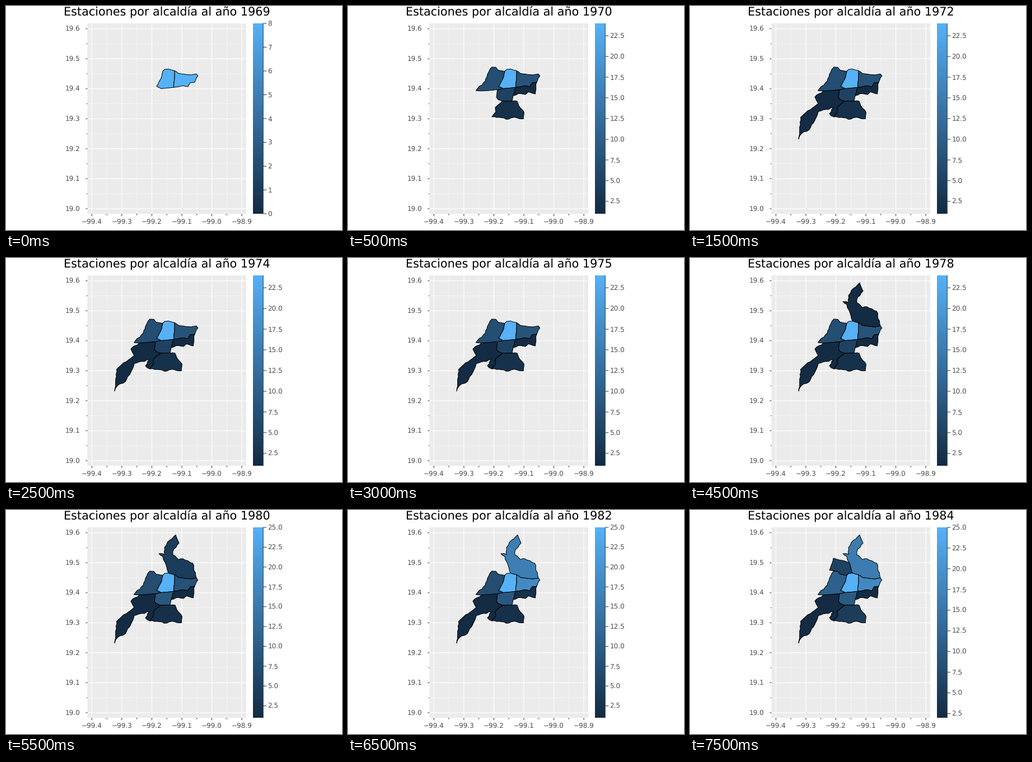
These frames come from a looping animation (600 px wide and 400 px high, 8 s). A matplotlib script:

```python
import matplotlib.pyplot as plt
import numpy as np
from matplotlib.animation import FuncAnimation
from matplotlib.colors import LinearSegmentedColormap
from matplotlib.patches import Polygon, Rectangle

plt.rcParams.update({"font.family": "DejaVu Sans", "text.hinting": "none",
                     "path.snap": False})

W, H, DPI = 600, 400, 100
PX = 72 / DPI  # points per pixel
LEFT, RIGHT, TOP, BOTTOM = 145.5, 429, 31, 371
BAR_L, BAR_R = 441.3, 459.3
STEP = 53.55  # pixels per 0.1 degree
TEXT, AXIS = "#4d4d4d", "#333333"
FIRST_YEAR, YEARS = 1969, 16
BLUES = LinearSegmentedColormap.from_list("blues", ["#132b43", "#56b1f7"])

fig = plt.figure(figsize=(W / DPI, H / DPI), dpi=DPI, facecolor="white")
ax = fig.add_axes([0, 0, 1, 1])
ax.axis("off")
rng = np.random.default_rng(7)


def line(x, y, color, width=1, z=1, **kw):
    return ax.plot(x, y, color=color, lw=width * PX, zorder=z,
                   solid_capstyle="butt", **kw)[0]


def label(x, y, text, ha, size=12, color=TEXT):
    return ax.text(x, y, text, ha=ha, va="baseline",
                   fontsize=size * PX, color=color)


def draw_axes():
    ax.add_patch(Rectangle((LEFT, TOP), RIGHT - LEFT, BOTTOM - TOP,
                           fc="#ebebeb", ec="none", zorder=0))
    for i in range(13):
        major = i % 2 == 0
        grid = dict(color="white", width=1.2 if major else 0.7,
                    alpha=1 if major else 0.65)
        tick = 3.2 if major else 1.7

        y = 362 - i * STEP / 2
        line([LEFT, RIGHT], [y, y], **grid)
        line([LEFT - tick, LEFT], [y, y], AXIS)
        if major:
            label(132.7, y + 4.5, f"{19 + i / 20:.1f}", "right")

        x = 153.4 + i * STEP / 2
        if x < RIGHT:
            line([x, x], [TOP, BOTTOM], **grid)
            line([x, x], [BOTTOM, BOTTOM + tick + 1], AXIS)
            if major:
                label(x, 390, f"\u2212{99.4 - i / 20:.1f}", "center")


def rough(*points, amp=0.4):
    """Border through key points, made ragged in pieces of about 4 px."""
    out = [points[0]]
    for a, b in zip(np.array(points), np.array(points[1:])):
        dx, dy = b - a
        length = np.hypot(dx, dy)
        n = max(1, int(length // 4))
        t = np.arange(1, n + 1)[:, None] / n
        shift = rng.uniform(-amp, amp, (n, 1))
        shift[-1] = 0
        out.extend(a + t * (b - a) + shift * np.array([-dy, dx]) / length)
    return np.array(out)


def coast(*points):
    return rough(*points, amp=1.1)


def back(border):
    return border[::-1]


# Corners where three boroughs meet
NW, N, NE = (280, 116.5), (290, 112.5), (301, 115.5)
SE, S, SW = (299.5, 145.2), (277, 147.5), (269, 143.5)
HUB, FOOT_W, FOOT_E = (267, 149.7), (276, 170), (295, 160)
PORT, BEND, QUAY = (340, 121.3), (337, 136), (257, 198)
RIDGE, PASS, GATE = (284, 93.5), (257, 109), (238, 151.7)

# Shared borders
center_nw = rough(NW, (283, 113.3), N)
center_north = rough(N, NE)
center_east = rough(NE, (301, 126), SE)
center_south = rough(SE, S)
center_sw = rough(S, SW)
center_west = rough(SW, (278, 126), NW)
east_north = rough(NE, (308, 120.5), (330, 123), PORT)
east_south = rough(BEND, (329, 137), (325, 144), (317, 142.5), SE)
west_north = rough(PASS, (264, 109.5), (268, 114.5), NW)
west_hub = rough(S, HUB)
west_south = rough(HUB, GATE)
juarez_west = rough(HUB, (265, 163), (268, 167), FOOT_W)
juarez_south = rough(FOOT_W, (293, 170))
juarez_east = rough((293, 170), FOOT_E, SE)
south_west = rough(FOOT_W, (263, 181), (264, 189), QUAY)
north_west = rough(RIDGE, N)

borders = {
    "center": [center_nw, center_north, center_east, center_south,
               center_sw, center_west],
    "east": [east_north, coast(PORT, (342.7, 125), BEND), east_south,
             back(center_east)],
    "west": [west_north, back(center_west), back(center_sw), west_hub,
             west_south,
             coast(GATE, (228.5, 151), (245, 134), (249, 122), PASS)],
    "juarez": [juarez_west, juarez_south, juarez_east, center_south,
               west_hub],
    "iztac": [back(east_south),
              coast(BEND, (334.5, 157), (322, 153.5), (317, 158),
                    (304, 156.5), FOOT_E),
              juarez_east[-4:]],
    "obregon": [juarez_west, south_west,
                coast(QUAY, (249, 192.5), (256, 181.5), (229, 188.5),
                      (223, 204), (213, 221), (199, 228), (194, 237.5),
                      (197.5, 199), (207, 190), (229, 174), (223, 162.5),
                      GATE),
                back(west_south)],
    "coyo": [back(south_west), juarez_south,
             coast((293, 170), (302, 170), (305, 178), (314.3, 189.5),
                   (313.3, 201.5), (297, 198.7), (287, 202), QUAY)],
    "north": [back(east_north), back(center_north), back(north_west),
              coast(RIDGE, (280, 83), (273, 78), (283.5, 79), (283, 67),
                    (292, 54), (303, 44.3), (309, 59), (299.5, 70),
                    (298, 80), (308, 88.5), (316, 87), (333.5, 95), PORT)],
    "azcapo": [coast(PASS, (249, 107.5), (256, 86)),
               rough((256, 86), RIDGE), north_west, back(center_nw),
               back(west_north)],
}

# Station totals from the year each one takes effect
stations = {
    "center": {1969: 8, 1970: 24, 1980: 25},
    "east": {1969: 8, 1981: 16, 1982: 18},
    "west": {1970: 7, 1984: 11},
    "juarez": {1970: 5, 1980: 9, 1983: 10},
    "iztac": {1970: 1, 1982: 2},
    "obregon": {1972: 1, 1983: 2},
    "coyo": {1970: 2, 1983: 5},
    "north": {1978: 1, 1979: 4, 1981: 11, 1982: 16},
    "azcapo": {1983: 6},
}


def count(name, year):
    return max((n for y, n in stations[name].items() if y <= year), default=0)


draw_axes()
patches = {name: ax.add_patch(Polygon(np.vstack(parts), ec="black", lw=PX,
                                      joinstyle="round", zorder=3))
           for name, parts in borders.items()}
ax.imshow(np.linspace(1, 0, 256)[:, None], cmap=BLUES, aspect="auto",
          extent=(BAR_L, BAR_R, BOTTOM, TOP), zorder=2)
line([BAR_R, BAR_R], [TOP, BOTTOM], AXIS, z=3)
ticks = [(line([BAR_R, BAR_R + 6], [0, 0], AXIS, z=3),
          label(467.3, 0, "", "left")) for _ in range(10)]
title = label(287, 18, "", "center", 20.8, "black")
ax.set_xlim(0, W)
ax.set_ylim(H, 0)


def update(i):
    year = FIRST_YEAR + i
    title.set_text(f"Estaciones por alcaldía al año {year}")
    counts = {name: count(name, year) for name in stations}
    shown = [n for n in counts.values() if n]
    lo, hi = min(shown), max(shown)
    if lo == hi:
        lo = 0
    for name, n in counts.items():
        patches[name].set_visible(n > 0)
        patches[name].set_facecolor(BLUES((n - lo) / (hi - lo)))

    step, digits = (1, 0) if hi < 10 else (2.5, 1)
    first = np.ceil(lo / step) * step
    for k, (mark, text) in enumerate(ticks):
        value = first + k * step
        y = BOTTOM - (value - lo) / (hi - lo) * (BOTTOM - TOP)
        mark.set_ydata([y, y])
        text.set_y(y + 4.5)
        text.set_text(f"{value:.{digits}f}")
        mark.set_visible(value <= hi)
        text.set_visible(value <= hi)
    return []


anim = FuncAnimation(fig, update, frames=YEARS, interval=500,
                     repeat=True, repeat_delay=0, blit=False)
plt.show()
```
